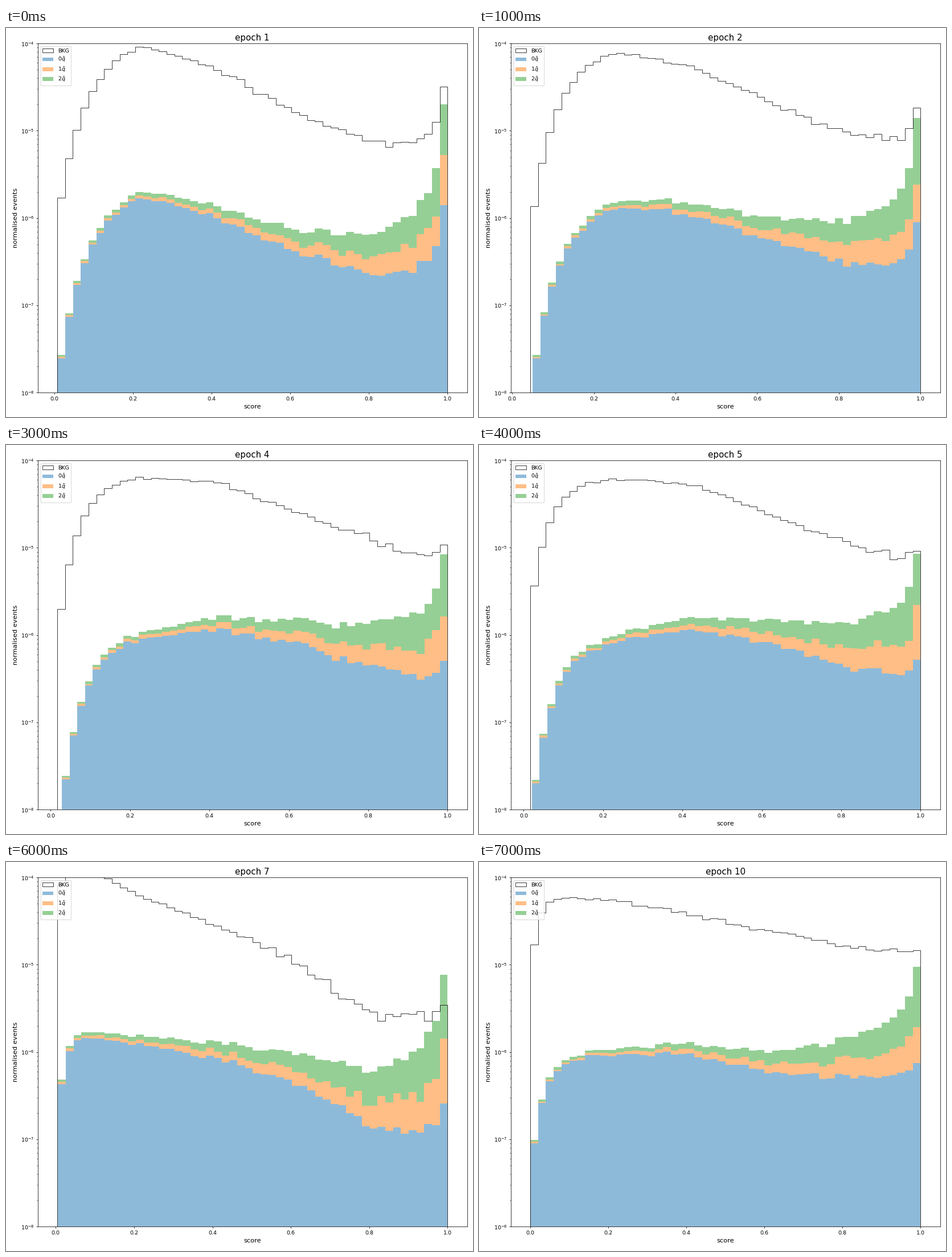
Animation, 820 px wide and 683 px high, one loop 8 s. Source, as a matplotlib script:

```python
import numpy as np
import matplotlib.pyplot as plt
from matplotlib.animation import FuncAnimation
from matplotlib.patches import Patch

W, H = 820, 683
DPI = W / 12
LEFT, RIGHT, TOP, BOTTOM = 55.8, 809.6, 27.2, 640.4
DECADE = (BOTTOM - TOP) / 4
FLOOR = 1e-9
BINS = 50
BIN = np.arange(BINS)
KEYS = [0, 10, 20, 30, 40, 49]
ORANGE_SHARE = 0.44
COLORS = ["tab:blue", "tab:orange", "tab:green"]
LABELS = [r"0$\tilde{q}$", r"1$\tilde{q}$", r"2$\tilde{q}$"]
LINE = dict(edgecolor="black", linewidth=1, alpha=0.8)


class Epoch:
    """Lowest scores, height of the signal stack and two curve shapes.

    A shape is (rise, rise length, end spike, body at KEYS), in pixel rows.
    """

    def __init__(self, bkg_lo, sig_lo, gap, bkg, blue):
        self.bkg_lo, self.sig_lo, self.gap = bkg_lo, sig_lo, gap
        self.bkg, self.blue = np.array(bkg), np.array(blue)


def blend(a, b, bkg_lo, sig_lo):
    return Epoch(bkg_lo, sig_lo, (a.gap + b.gap) / 2,
                 (a.bkg + b.bkg) / 2, (a.blue + b.blue) / 2)


epochs = {
    1: Epoch(0.0069, 0.0072, 112,
             [253, 3.3, 97, 45, 21, 72, 149, 203, 199],
             [262, 3.2, 108, 318, 288, 333, 394, 432, 422]),
    3: Epoch(0.0194, 0.0389, 122,
             [275, 2.7, 35, 54, 50, 62, 109, 167, 207],
             [240, 2.8, 50, 340, 329, 323, 350, 394, 422]),
    5: Epoch(0.0167, 0.0205, 120,
             [185, 2.2, 25, 62, 58, 68, 120, 170, 206],
             [244, 2.6, 33, 350, 340, 324, 349, 390, 412]),
    6: Epoch(0.0176, 0.0144, 105,
             [148, 2.2, 8, 69, 67, 82, 98, 141, 172],
             [282, 2.2, 18, 365, 361, 340, 335, 367, 375]),
    7: Epoch(0.0040, 0.0057, 155,
             [55, 0.6, 30, -15, 59, 112, 176, 270, 275],
             [90, 0.9, 45, 300, 320, 346, 387, 464, 478]),
    10: Epoch(0.0003, 0.0003, 105,
              [85, 0.9, 12, 60, 66, 91, 123, 148, 163],
              [144, 1.5, 22, 350, 340, 338, 370, 378, 374]),
}
epochs[2] = blend(epochs[1], epochs[3], 0.0444, 0.0500)
epochs[4] = blend(epochs[3], epochs[5], 0.0166, 0.0280)
ORDER = sorted(epochs)


def to_value(row):
    return 10 ** (-4 - (row - TOP) / DECADE)


def curve(shape):
    rise, length, spike, *body = shape
    return (np.interp(BIN, KEYS, body) + rise * np.exp(-BIN / length)
            - spike * np.exp(BIN - BINS + 1.0))


def scatter(rng, rows, size):
    """Counting noise: the emptier the bin, the larger the jump."""
    settled = np.minimum(BIN / 8, 1)
    return rng.normal(0, size, BINS) * settled * 10 ** ((rows - TOP) / (2 * DECADE))


def stack(ep, rng):
    blue = curve(ep.blue)
    gap = ep.gap * np.exp((BIN - 47) / 16) + 50 * np.exp(BIN - BINS + 1.0)
    share = ORANGE_SHARE * rng.uniform(0.8, 1.2, BINS)
    blue += scatter(rng, blue, 0.25)
    return blue, blue - share * gap, blue - gap


fig = plt.figure(figsize=(820.005 / DPI, 683.005 / DPI), dpi=DPI, facecolor="white")
ax = fig.add_axes([LEFT / W, 1 - BOTTOM / H, (RIGHT - LEFT) / W, (BOTTOM - TOP) / H])


def draw(i):
    number = ORDER[i]
    ep = epochs[number]
    rng = np.random.default_rng(number)
    ax.clear()

    edges = np.linspace(ep.sig_lo, 1, BINS + 1)
    base = np.full(BINS, FLOOR)
    for rows, color in zip(stack(ep, rng), COLORS):
        top = to_value(rows)
        ax.stairs(top, edges, baseline=base, fill=True, color=color, alpha=0.5,
                  linewidth=0)
        base = top

    bkg = curve(ep.bkg)
    bkg += scatter(rng, bkg, 1.2)
    ax.stairs(to_value(bkg), np.linspace(ep.bkg_lo, 1, BINS + 1), baseline=FLOOR,
              **LINE)

    lo = min(ep.bkg_lo, ep.sig_lo)
    margin = 0.05 * (1 - lo)
    ax.set_yscale("log")
    ax.set_ylim(1e-8, 1e-4)
    ax.set_xlim(lo - margin, 1 + margin)
    ax.set_xticks(np.arange(6) / 5)
    ax.set_title(f"epoch {number}", fontsize=16)
    ax.set_xlabel("score", fontsize=12)
    ax.set_ylabel("normalised events", fontsize=12)

    keys = [Patch(fill=False, label="BKG", **LINE)]
    keys += [Patch(facecolor=c, alpha=0.5, linewidth=0, label=t)
             for c, t in zip(COLORS, LABELS)]
    ax.legend(handles=keys, loc="upper left", fontsize=10, labelspacing=0.38)
    return ax.get_children()


anim = FuncAnimation(fig, draw, frames=len(ORDER), init_func=lambda: draw(0),
                     interval=1000, repeat=True, repeat_delay=0)
plt.show()
```
